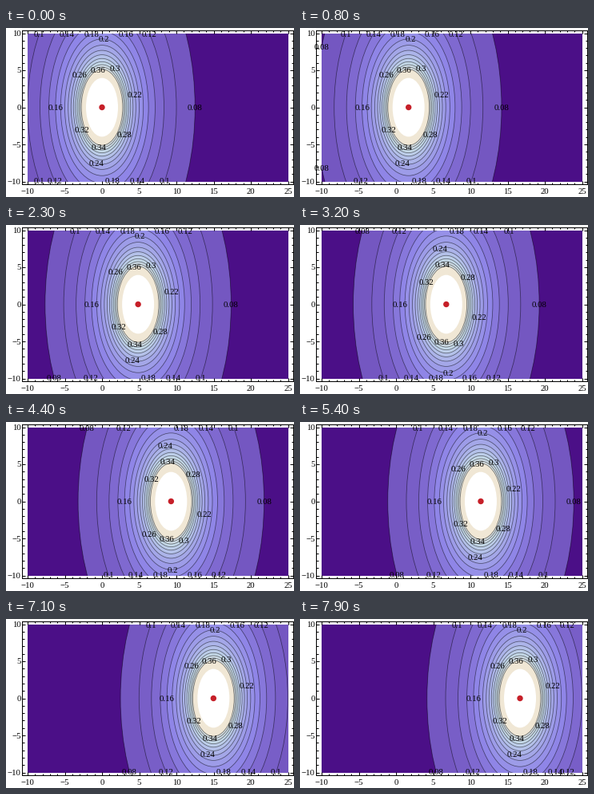
Recreate the animation shown at these times as a matplotlib script. Size 360x212 px, loop 8 s.

```python
import numpy as np
import matplotlib.pyplot as plt
from matplotlib.animation import FuncAnimation
from matplotlib.colors import LinearSegmentedColormap
from matplotlib.patches import Ellipse, Rectangle

W, H, DPI = 360, 212, 100
FRAMES, STEP_MS = 80, 100
X0, Y0, UNIT = 120, 99.5, 9.3        # pixel position of (0, 0), pixels per unit
XMIN, XMAX, YMAX = -10, 25, 10
PAD = 0.02                           # gap between plot and frame
SPEED = 0.211                        # units per frame
SQUASH = np.sqrt(1 - 0.84**2)        # field: 1 / sqrt(x^2 + (SQUASH y)^2)
CORE = 2.15                          # radius of the blank centre
RIM = 9.9                            # height of labels at the plot's rim

LEVELS = np.linspace(0.08, 0.36, 15)
OPEN, CLOSED = LEVELS[:6], LEVELS[6:]
ANGLES = np.radians([87, 12, -101, 141, -34, 59, -148, -99, 102])

lake = LinearSegmentedColormap.from_list("lake", [
    (0.293, 0.057, 0.529), (0.564, 0.528, 0.909),
    (0.763, 0.847, 0.914), (0.941, 0.907, 0.834)])


def px(x):
    return X0 + UNIT * x


def py(y):
    return Y0 - UNIT * y


def pt(pixels):
    return pixels * 72 / DPI


fig = plt.figure(figsize=(W / DPI, H / DPI), dpi=DPI, facecolor="white")
ax = fig.add_axes([0, 0, 1, 1])
ax.set_xlim(0, W)
ax.set_ylim(H, 0)
ax.axis("off")


def write(x, y, s, ha="center"):
    return ax.text(x, y + 3.5, s, ha=ha, va="baseline", color="black",
                   family="Liberation Serif", size=pt(10.7), zorder=6)


def line(xs, ys):
    ax.plot(xs, ys, color="black", lw=pt(1), solid_capstyle="butt", zorder=5)


def draw_frame():
    dx, dy = PAD * (XMAX - XMIN), PAD * 2 * YMAX
    left, right = px(XMIN - dx), px(XMAX + dx)
    top, bottom = py(YMAX + dy), py(-YMAX - dy)
    line([left, right, right, left, left], [top, top, bottom, bottom, top])

    def tick_size(v):
        return 4 if v % 5 == 0 else 2.4

    def name(v):
        return str(v).replace("-", "\u2212")

    for v in range(XMIN, XMAX + 1):
        for y, inward in ((top, 1), (bottom, -1)):
            line([px(v)] * 2, [y, y + inward * tick_size(v)])
        if v % 5 == 0:
            write(px(v), 204.5, name(v))
    for v in range(-YMAX, YMAX + 1):
        for x, inward in ((left, 1), (right, -1)):
            line([x, x + inward * tick_size(v)], [py(v)] * 2)
        if v % 5 == 0:
            write(18.5, py(v), name(v), "right")


def shade(k):
    """Fill colour of the band just above level k."""
    last = len(LEVELS) - 1
    return lake(1.0 if k == last else 0.2 + 0.6 * (k / (last - 1))**1.3)


plot_area = Rectangle((px(XMIN), py(YMAX)), UNIT * (XMAX - XMIN),
                      UNIT * 2 * YMAX, fc=lake(0.0), ec="none")
ax.add_patch(plot_area)


def add_oval(radius, face, edge="none"):
    oval = Ellipse((0, 0), 2 * UNIT * radius, 2 * UNIT * radius / SQUASH,
                   fc=face, ec=edge, lw=pt(0.8))
    ax.add_patch(oval)
    oval.set_clip_path(plot_area)
    return oval


ovals = [add_oval(1 / v, shade(k), (0, 0, 0, 0.5)) for k, v in enumerate(LEVELS)]
ovals.append(add_oval(CORE, "white"))
dot = ax.add_patch(Ellipse((0, 0), 7.4, 7.4, fc="#c61f28", ec="none", zorder=4))
draw_frame()
labels = []


def arc_points(k, side, c):
    """Label points on the left (-1) or right (1) arc of an open level."""
    r = 1 / OPEN[k]
    bound = XMAX if side > 0 else XMIN

    def reach(y):
        return c + side * np.sqrt(r**2 - (SQUASH * y)**2)

    if side * reach(RIM) > side * bound:
        return []
    if side * reach(0) >= side * bound:      # cut in two by the plot's side
        cut = np.sqrt(max(r**2 - (bound - c)**2, 0)) / SQUASH
        heights = [h * (cut if cut > YMAX / 2 else RIM) for h in (1, -1)]
    elif k % 4 == 0 and side == 1 - k // 2:  # every fourth level: mid-height
        heights = [0]
    else:                                    # otherwise alternate top, bottom
        heights = [side * RIM * (-1)**k]
    return [(reach(y), y) for y in heights]


def label_points(i, c):
    flip = -1 if abs(i - 36) < 12 else 1     # labels mirror mid-way
    for k, level in enumerate(OPEN):
        for side in (-1, 1):
            for x, y in arc_points(k, side, c):
                yield level, x, flip * y
    for level, a in zip(CLOSED, ANGLES):
        yield level, c + np.cos(a) / level, flip * np.sin(a) / level / SQUASH


def update(i):
    c = SPEED * i
    for shape in (*ovals, dot):
        shape.center = (px(c), py(0))
    for label in labels:
        label.remove()
    labels[:] = [write(px(x), py(y), f"{level:.2g}")
                 for level, x, y in label_points(i, c)]
    return [*ovals, dot, *labels]


anim = FuncAnimation(fig, update, frames=FRAMES, interval=STEP_MS,
                     init_func=lambda: update(0), repeat=True, repeat_delay=0)
plt.show()
```
